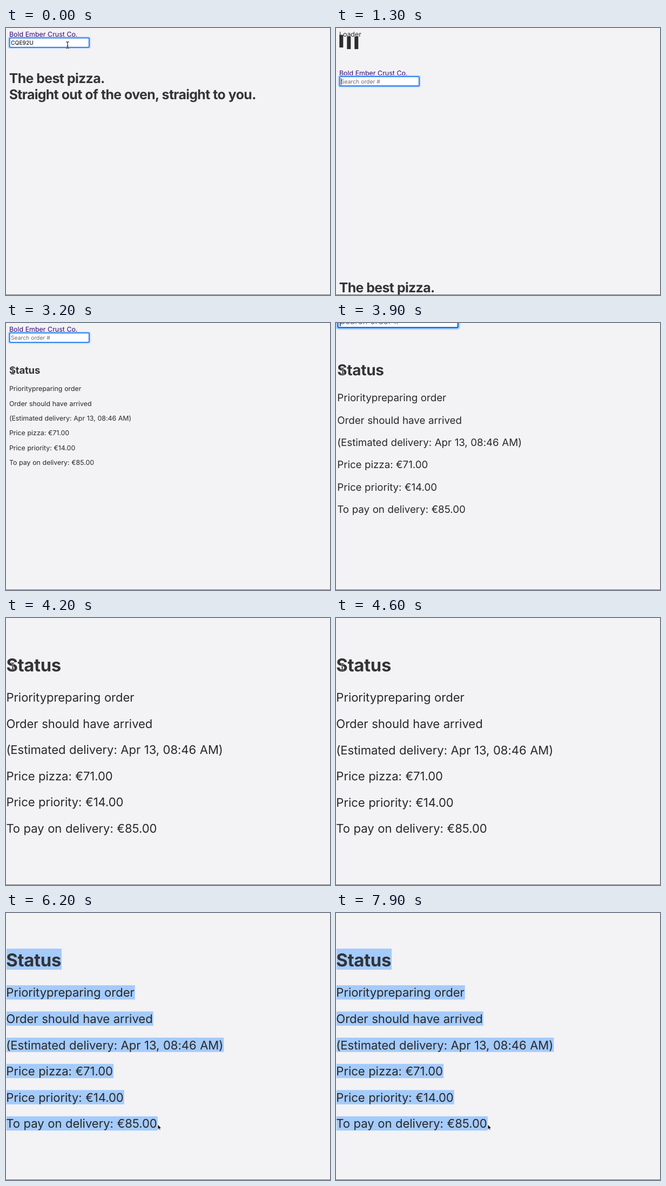
These frames come from a looping animation (600 px wide and 495 px high, 8 s). An HTML page:

```html
<!DOCTYPE html>
<html lang="en">
<head>
<meta charset="utf-8">
<style>
  html, body { margin: 0; width: 100%; height: 100%; overflow: hidden; background: #f3f2f5; }
  svg { display: block; width: 600px; height: 495px; }
  text {
    font: 12.45px Inter, "Open Sans", sans-serif;
    font-optical-sizing: none;
    letter-spacing: -.003em;
    word-spacing: .02em;
    text-rendering: geometricPrecision;
    white-space: pre;
    fill: #29282b;
  }
  .h1, .h2 { font-weight: 700; fill: #343336; }
  .h1 { font-size: 24.9px; letter-spacing: -.027em; }
  .h2 { font-size: 18.5px; letter-spacing: -.011em; }
  #link { fill: #360a7a; }
  #field { font-size: 10.35px; }
</style>
</head>
<body>
<svg viewBox="0 0 600 495">
  <g id="page">
    <g id="loader">
      <g id="bars" fill="#2d2b2b"></g>
      <text x="5.9" y="16.4">Loader</text>
    </g>
    <g id="header">
      <text id="link" x="5.9" y="16.4">Bold Ember Crust Co.</text>
      <rect x="3.7" y="15.9" width="153" height="22.4" rx="4" fill="#b3d3fa"/>
      <rect x="6.7" y="18.5" width="147.2" height="17.2" rx="1.5" fill="#fff" stroke="#0a6aea" stroke-width="1.6"/>
      <text id="field" x="9" y="31.2"></text>
      <rect id="caret" y="21.5" width="1" height="12.5" fill="#222"/>
    </g>
    <g id="home">
      <text class="h1" x="5.7" y="102">The best pizza.</text>
      <text class="h1" x="5.7" y="131.8">Straight out of the oven, straight to you.</text>
    </g>
    <g id="status"></g>
  </g>
  <rect y="494" width="600" height="1" fill="#6f6e71"/>
  <g id="pointer" stroke-linejoin="round">
    <g id="beam" fill="none">
      <use href="#beamPath" stroke="#fff" stroke-opacity=".75" stroke-width="2.6"/>
      <use href="#beamPath" stroke="#222" stroke-width="1.2"/>
    </g>
    <path id="arrow" d="M0 0V9.6L2.2 7.6L3.7 11L5.2 10.3L3.8 7H6.8Z" fill="#111" stroke="#fff" stroke-width=".8"/>
  </g>
  <defs>
    <path id="beamPath" d="M-3-6Q0-6 0-4Q0-6 3-6M0-4V4M-3 6Q0 6 0 4Q0 6 3 6M-1.5 2H1.5"/>
  </defs>
</svg>
<script>
const LOOP = 8000, LOAD = 1250, DONE = 2500, SELECTED = 5950;
const ZOOM = 1.777, FOCUS = { x: 13, y: 89 }, LEFT = 5.9;
const $ = id => document.getElementById(id);
const clamp = v => Math.max(0, Math.min(1, v));
const smooth = v => v * v * (3 - 2 * v);
const show = (id, on) => $(id).style.display = on ? '' : 'none';
const set = (el, attrs) => { for (const k in attrs) el.setAttribute(k, attrs[k]); };

function add(parent, tag, attrs) {
  const el = document.createElementNS('http://www.w3.org/2000/svg', tag);
  set(el, attrs);
  return $(parent).appendChild(el);
}

// Piecewise linear value from rows of [time, ...values]
function track(rows, t) {
  const i = rows.findIndex(r => r[0] > t);
  if (i < 1) return rows.at(i).slice(1);
  const a = rows[i - 1], b = rows[i], k = (t - a[0]) / (b[0] - a[0]);
  return a.slice(1).map((v, j) => v + (b[j + 1] - v) * k);
}

const bars = [0, 1, 2].map(i => add('bars', 'rect', { x: 6.3 + 14 * i, width: 7, height: 23.4 }));

const lines = [
  'Status', 'Prioritypreparing order', 'Order should have arrived',
  '(Estimated delivery: Apr 13, 08:46 AM)', 'Price pizza: €71.00',
  'Price priority: €14.00', 'To pay on delivery: €85.00'
].map((words, i) => {
  const y = i ? 126.4 + 27.34 * (i - 1) : 94.4;
  const mark = add('status', 'rect', {
    x: LEFT + .3, y: i ? y - 12.1 : 76.1, height: i ? 14.9 : 22, fill: '#a4cbfa'
  });
  const text = add('status', 'text', { x: LEFT, y, class: i ? '' : 'h2' });
  text.textContent = words;
  return { text, mark, size: words.length };
});

const path = [
  [2600, 114, 31.5], [3200, 12.5, 89], [4500, 12.5, 89], [4600, 11.5, 90],
  [4900, 6, 90], [5050, 2, 88], [5400, 227, 256], [SELECTED, 281, 392]
];

function drawLoader(t) {
  const p = (t - LOAD) / 1000 % 1;
  bars.forEach((bar, i) => {
    const s = .2 * i;
    const [k] = track([[0, .5], [s, .5], [s + .2, 0], [s + .4, 1], [s + .6, .5], [1.1, .5]], p);
    set(bar, { y: 4 + 23.4 * k });
  });
}

function drawSelection(t, x, y) {
  const row = t < 5050 ? -1 : y < 123 ? 0 : 1 + Math.floor((y - 123) / 48.6);
  const reach = (x - FOCUS.x) / ZOOM + FOCUS.x - LEFT - 2.6;
  lines.forEach(({ text, mark, size }, i) => {
    let n = i < row || t >= SELECTED ? size : 0;
    if (i === row) while (n < size && text.getSubStringLength(0, n + 1) < reach) n++;
    set(mark, { width: n ? text.getSubStringLength(0, n) + .3 : 0 });
  });
}

function draw(t) {
  const loading = t >= LOAD && t < DONE, typed = t < 1000;
  show('loader', loading);
  show('home', t < DONE);
  show('status', t >= DONE);
  set($('header'), { transform: `translate(0 ${loading ? 71.7 : 0})` });
  set($('home'), { transform: `translate(0 ${loading ? 388 : 0})` });
  if (loading) drawLoader(t);

  $('field').textContent = typed ? 'CQE92U' : 'Search order #';
  $('field').style.fill = typed ? '#000' : '#6c6c6e';
  set($('caret'), { x: typed ? 51.3 : 9 });
  show('caret', typed ? t >= 100 && t < 600
    : t < DONE ? Math.floor(t / 500) % 2 === 0
    : t >= 3500 && t < 4000);

  const s = 1 + (ZOOM - 1) * smooth(clamp((t - 3400) / 826));
  set($('page'), {
    transform: `translate(${FOCUS.x * (1 - s)} ${FOCUS.y * (1 - s)}) scale(${s})`
  });

  const [x, y] = track(path, t);
  show('pointer', t < 100 || t >= 2600);
  set($('pointer'), { transform: `translate(${x} ${y})` });
  show('arrow', t >= SELECTED);
  show('beam', t < SELECTED);
  if (t >= DONE) drawSelection(t, x, y);
}

function tick(now) {
  draw(now % LOOP);
  requestAnimationFrame(tick);
}
draw(0);
requestAnimationFrame(tick);
</script>
</body>
</html>
```
